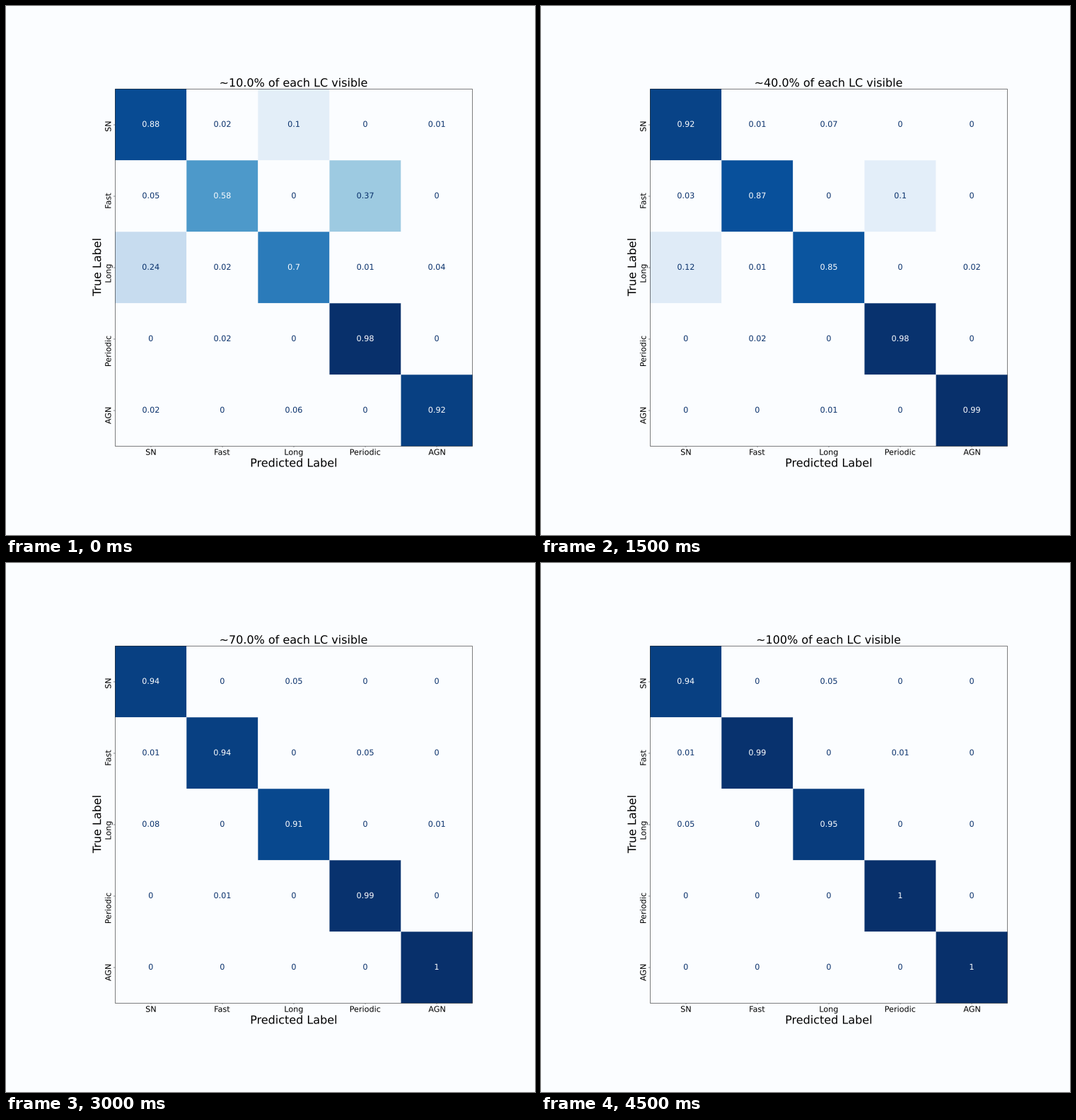
Recreate the animation shown at these times as a matplotlib script. Size 748 by 748 pixels, loop 5000 ms.

```python
import matplotlib.pyplot as plt
from matplotlib.animation import FuncAnimation
from matplotlib.patches import PathPatch, Rectangle
from matplotlib.textpath import TextPath
from matplotlib.transforms import Affine2D

SIZE, DPI, STEPS = 748, 64, 10
PT = 72 / DPI
SMALL, LARGE = 11.2, 16.0
LEFT, TOP, STEP_X, STEP_Y = 154.2, 117.2, 101.08, 101.04
BG = "#fbfdff"
BLUES = plt.get_cmap("Blues")
CLASSES = ["SN", "Fast", "Long", "Periodic", "AGN"]
N = len(CLASSES)
CELLS = [(r, c) for r in range(N) for c in range(N)]


def fade(tail, slope, fast=0, keep=0.5):
    """Confusion in percent: a straight tail plus a part shrinking each step."""
    return lambda t: max(0, tail - slope * t + fast * keep ** t)


# Share of a true class (row) that is mistaken for another (column)
MISTAKES = {
    (0, 1): fade(1.6, 0.2),
    (0, 2): fade(5.03, 0, 4.7, 0.68),
    (0, 3): fade(-0.55, -0.1),
    (0, 4): fade(0.8, 0.2),
    (1, 0): fade(3.25, 0.3, 1.5),
    (1, 2): fade(0.35, 0.035),
    (1, 3): fade(11.6, 1.2, 25.4, 0.4),
    (1, 4): fade(0.35, 0.035),
    (2, 0): fade(12.6, 0.8, 11.85),
    (2, 1): fade(1.6, 0.2),
    (2, 3): fade(0.63, 0.15),
    (2, 4): fade(2.7, 0.33, 1.1),
    (3, 1): fade(2.3, 0.265),
    (4, 0): fade(1.85, 1.3),
    (4, 2): fade(0, 0, 5.5),
    (4, 3): fade(0.18, 0),
}


def matrix(step):
    """Whole percentages per cell; the diagonal takes what is left of a row."""
    wrong = {cell: f(step) for cell, f in MISTAKES.items()}
    for k in range(N):
        wrong[k, k] = 100 - sum(v for (r, _), v in wrong.items() if r == k)
    return {cell: round(wrong.get(cell, 0)) for cell in CELLS}


fig = plt.figure(figsize=(SIZE / DPI, SIZE / DPI), dpi=DPI, facecolor=BG)
ax = fig.add_axes([0, 0, 1, 1])
ax.set_xlim(0, SIZE)
ax.set_ylim(SIZE, 0)
ax.axis("off")


def text_path(s, x, y, size, align="center", angle=0):
    """Outline of s in pixels, with its baseline anchored at (x, y)."""
    path = TextPath((0, 0), s, size=size, prop={"family": "DejaVu Sans"})
    box = path.get_extents()
    shift = box.x1 if align == "right" else (box.x0 + box.x1) / 2
    move = Affine2D().translate(-shift, 0).rotate_deg(angle).scale(1, -1)
    return move.translate(x, y).transform_path(path)


def add_text(*args, **kwargs):
    return ax.add_patch(PathPatch(text_path(*args, **kwargs), fc="black",
                                  ec="none", lw=0, snap=False, zorder=3))


def col_x(c):
    return LEFT + (c + 0.5) * STEP_X


def row_y(r):
    return TOP + (r + 0.5) * STEP_Y


def cell_text(cell, percent):
    r, c = cell
    return f"{percent / 100:g}", col_x(c), row_y(r) + 3.1, SMALL


def title_text(step):
    share = (step + 1) / STEPS * 100
    shown = f"{share:.1f}" if share < 100 else "100"
    return f"~{shown}% of each LC visible", col_x(2), 114, LARGE


tiles, labels = {}, {}
for r, c in CELLS:
    corner = LEFT + c * STEP_X, TOP + r * STEP_Y
    tiles[r, c] = ax.add_patch(Rectangle(corner, STEP_X, STEP_Y, fc=BG,
                                         ec="none", lw=0, snap=False))
    labels[r, c] = add_text(*cell_text((r, c), 0))
title = add_text(*title_text(0))

# Frame, ticks and axis names
ax.add_patch(Rectangle((154.5, 117.5), 505, 505, fill=False, ec="black",
                       lw=0.5 * PT, snap=False, zorder=2))
for k, name in enumerate(CLASSES):
    x, y = col_x(k), row_y(k)
    ax.plot([x, x], [622.5, 624.4], color="black", lw=0.43 * PT)
    ax.plot([152.4, 154.3], [y, y], color="black", lw=0.43 * PT)
    add_text(name, x, 634.7, SMALL)
    add_text(name, 148.4, y - 4.2, SMALL, "right", 90)
add_text("Predicted Label", col_x(2), 651.5, LARGE)
add_text("True Label", 134.2, row_y(2), LARGE, angle=90)


def draw(step):
    title.set_path(text_path(*title_text(step)))
    values = matrix(step)
    peak = max(values.values())
    for cell, v in values.items():
        # The faintest tints are shown as plain background.
        tiles[cell].set_facecolor(BLUES(v / peak) if v > 8 else BG)
        labels[cell].set_path(text_path(*cell_text(cell, v)))
        labels[cell].set_facecolor(BG if v > peak / 2 else BLUES(1.0))
    return [title, *tiles.values(), *labels.values()]


anim = FuncAnimation(fig, draw, frames=STEPS, interval=500, repeat=True,
                     repeat_delay=0, blit=False)
plt.show()
```
